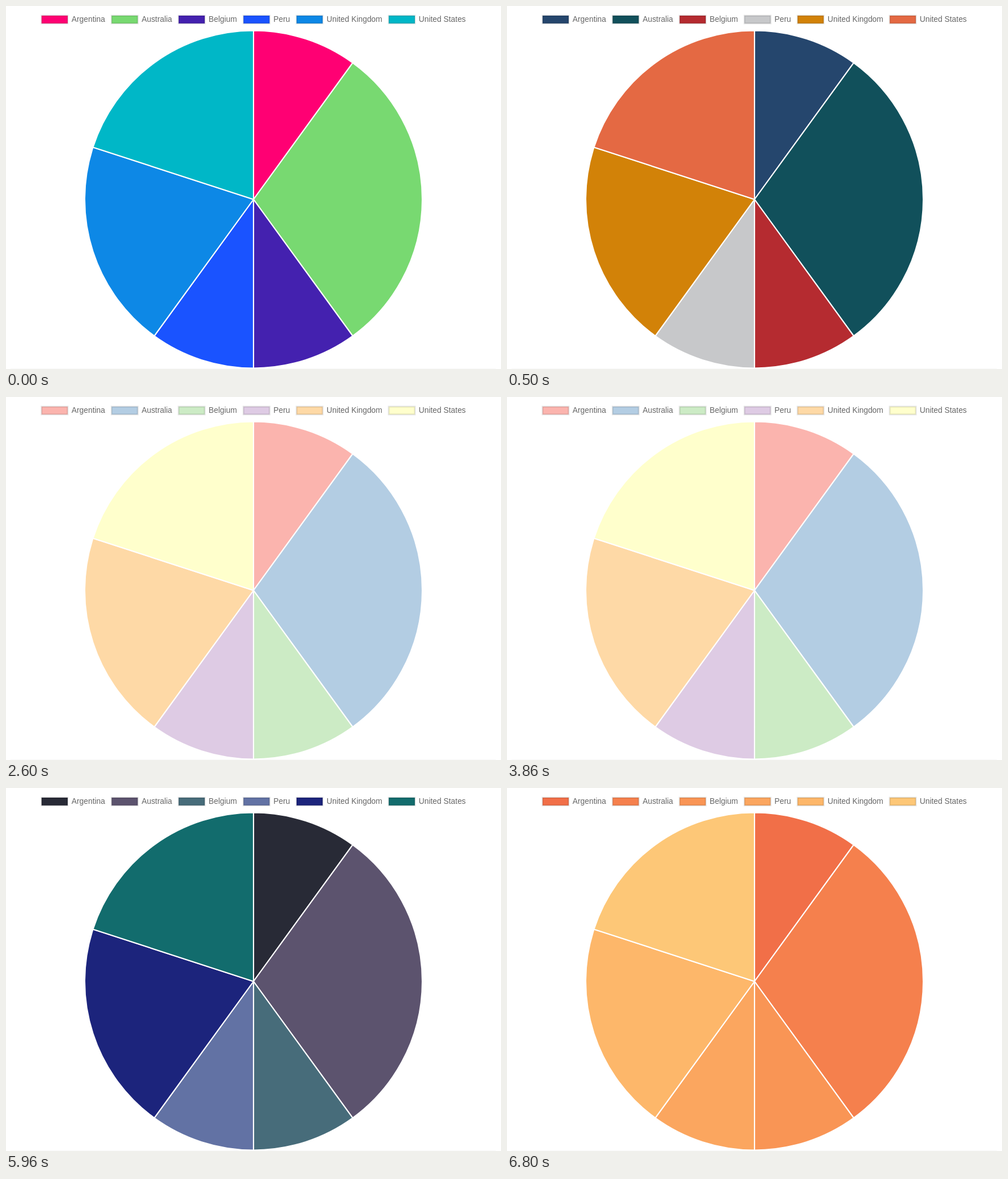
Animation, 874 px wide and 641 px high, one loop 8 s. Source, as an HTML page:

```html
<!DOCTYPE html>
<html lang="en">
<head>
<meta charset="utf-8">
<title>Pie chart palettes</title>
<style>
html, body { margin: 0; width: 100%; height: 100%; overflow: hidden; background: #fff; }
svg { display: block; width: 874px; height: 641px; }
text { font: 13.82px "Liberation Sans", Arial, sans-serif; fill: #666; }
path { stroke: #fff; stroke-width: 2.1; stroke-linejoin: bevel; }
rect { stroke: rgba(0, 0, 0, .11); stroke-width: 2.9; }
</style>
</head>
<body>
<svg id="chart" viewBox="0 0 874 641">
  <line x1="8" x2="865" y1="640.5" y2="640.5" stroke="#f8f8f8"/>
</svg>
<script>
const LOOP = 8000;
const CX = 437, CY = 341.5, R = 298;

// label, share of the pie, legend x
const slices = [
  ['Argentina', .1, 62.8],
  ['Australia', .3, 186.5],
  ['Belgium', .1, 304.8],
  ['Peru', .1, 419.3],
  ['United Kingdom', .2, 513],
  ['United States', .2, 675.8]
];

// start time in ms, slice colours
const palettes = [
  [0, '#ff0073 #78d971 #4421af #1a53ff #0d88e6 #00b7c7'],
  [500, '#25466d #11505b #b52b30 #c7c8ca #d28208 #e46943'],
  [2600, '#fbb4ae #b3cde3 #ccebc5 #decbe4 #fed9a6 #ffffcc'],
  [4700, '#282a36 #5c536e #476c7a #6272a4 #1c247c #126c6d'],
  [6800, '#f16f48 #f5804d #f99555 #fba65f #fdb76a #fdc777']
].map(([start, colors]) => ({ start, colors: colors.split(' ') }));

const chart = document.getElementById('chart');

function add(tag, attrs) {
  const el = document.createElementNS('http://www.w3.org/2000/svg', tag);
  for (const key in attrs) el.setAttribute(key, attrs[key]);
  return chart.appendChild(el);
}

function rim(turn) {
  const a = turn * 2 * Math.PI;
  return `${CX + R * Math.sin(a)} ${CY - R * Math.cos(a)}`;
}

let turn = 0;
const parts = slices.map(([label, share, x]) => {
  const from = rim(turn);
  turn += share;
  const wedge = add('path', { d: `M${CX} ${CY}L${from}A${R} ${R} 0 0 1 ${rim(turn)}Z` });
  const swatch = add('rect', { x, y: 17, width: 46.1, height: 13.8 });
  add('text', { x: x + 53, y: 28 }).textContent = label;
  return [wedge, swatch];
});

let shown;
function draw() {
  const t = performance.now() % LOOP;
  const palette = palettes.findLast(p => p.start <= t);
  if (palette !== shown) {
    shown = palette;
    parts.forEach((pair, i) => pair.forEach(el => el.setAttribute('fill', palette.colors[i])));
  }
  requestAnimationFrame(draw);
}
draw();
</script>
</body>
</html>
```
